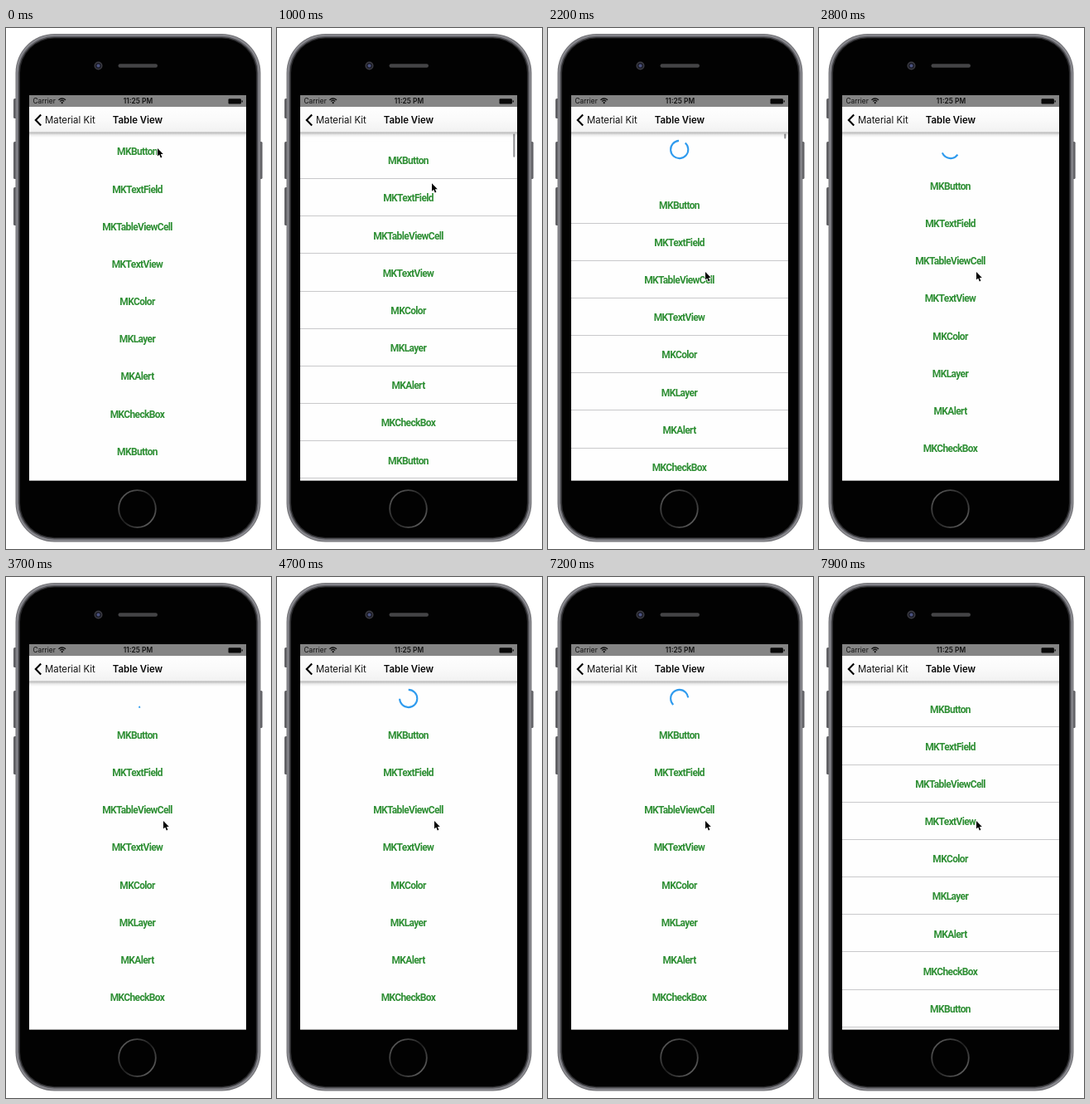
Recreate the animation shown at these times as an HTML page with a canvas. Size 320x628 px, loop 8 s.

```html
<!DOCTYPE html>
<html lang="en">
<head>
<meta charset="utf-8">
<title>Pull to refresh</title>
<style>
html, body { margin: 0; width: 100%; height: 100%; overflow: hidden; background: #fff; }
canvas { display: block; width: 320px; height: 628px; }
</style>
</head>
<body>
<canvas id="stage"></canvas>
<script>
const W = 320, H = 628, LOOP = 8000;
const canvas = document.getElementById('stage');
const ctx = canvas.getContext('2d');
const dpr = window.devicePixelRatio || 1;
canvas.width = W * dpr;
canvas.height = H * dpr;

const SCREEN = { x: 28, y: 81, w: 262, h: 464.5 };
const ROWS = ['MKButton', 'MKTextField', 'MKTableViewCell', 'MKTextView', 'MKColor',
  'MKLayer', 'MKAlert', 'MKCheckBox', 'MKButton', 'MKTextField'];
const ROW_H = 45.17, LIST_TOP = 125.6, CENTER = 158.5;
const GRAB_Y = 165.5, HELD = 41.5;
const RELEASE = 2365, CLOSE = 7680, SPIN_RATE = 1.08;
// time, x, y of the pointer
const POINTER = [[0, 183, 145], [200, 183, 145], [500, 184, 153], [770, 186, 166],
  [1000, 187, 187], [1200, 188, 216], [1400, 189, 250], [1550, 190, 275],
  [1700, 190, 292], [1900, 190, 294]];

const clamp = v => Math.max(0, Math.min(1, v));
const mix = (a, b, p) => a + (b - a) * p;
const ease = p => p * p * (3 - 2 * p);
const easeOut = p => 1 - (1 - p) ** 3;

function pointerAt(t) {
  const n = POINTER.findIndex(k => k[0] > t);
  if (n < 0) return POINTER[POINTER.length - 1].slice(1);
  const a = POINTER[n - 1], b = POINTER[n], p = (t - a[0]) / (b[0] - a[0]);
  return [mix(a[1], b[1], p), mix(a[2], b[2], p)];
}

function pullAt(t) {
  if (t < RELEASE) return Math.max(0, (pointerAt(t)[1] - GRAB_Y) / 2);
  if (t < CLOSE) return mix(64, HELD, easeOut(clamp((t - RELEASE) / 320)));
  return mix(HELD, 0, ease(clamp((t - CLOSE) / 326)));
}

function rounded(x, y, w, h, r, fill) {
  ctx.beginPath();
  ctx.roundRect(x, y, w, h, r);
  ctx.fillStyle = fill;
  ctx.fill();
}

function disc(x, y, r, fill) {
  ctx.beginPath();
  ctx.arc(x, y, r, 0, Math.PI * 2);
  ctx.fillStyle = fill;
  ctx.fill();
}

function rect(x, y, w, h, fill) {
  ctx.fillStyle = fill;
  ctx.fillRect(x, y, w, h);
}

function gradient(x0, y0, x1, y1, ...colors) {
  const g = ctx.createLinearGradient(x0, y0, x1, y1);
  colors.forEach((c, i) => g.addColorStop(i / (colors.length - 1), c));
  return g;
}

function label(text, x, y, font, color = '#000', align = 'left') {
  ctx.font = font;
  ctx.fillStyle = color;
  ctx.textAlign = align;
  ctx.fillText(text, x, y);
}

// nested outline of the phone, d pixels in from its edge
function shell(d, fill) {
  rounded(11.5 + d, 7 + d, 296 - 2 * d, 612.5 - 2 * d, 47 - d, fill);
}

function drawPhone() {
  for (const [x, y, h] of [[9, 85, 24], [9, 137, 45], [9, 192, 46], [305, 137, 45]])
    rounded(x, y, 4.6, h, 1.5, '#606064');
  shell(0, '#77777b');
  shell(1.2, '#8c8c92');
  shell(2.8, '#5c5c61');
  shell(4.2, '#262628');
  shell(5.6, '#020202');

  disc(111.5, 45.5, 5, '#3c3c43');
  disc(111.5, 45.5, 3.6, '#1c1c26');
  disc(111.5, 45.5, 2, '#4a5280');
  rounded(135.5, 43.2, 47.5, 4.6, 2.3, '#444446');

  ctx.beginPath();
  ctx.arc(158.5, 579.5, 22.3, 0, Math.PI * 2);
  ctx.strokeStyle = gradient(142, 563, 175, 596, '#555', '#1d1d1d', '#5a5a5a');
  ctx.lineWidth = 1.8;
  ctx.stroke();
}

function drawSpinner(t, pull) {
  let head = 0, tail = clamp(pull / HELD) * 0.875, turn = 0;
  if (t >= RELEASE) {
    const s = (t - RELEASE) / 1000 * SPIN_RATE, p = s % 1.5;
    turn = s * Math.PI / 2;
    head = p < 1 ? ease(p) * 0.25 : mix(0.25, 1, ease((p - 1) * 2));
    tail = p < 1 ? ease(p) : 1;
  }
  if (tail - head < 0.002) return;
  const span = Math.PI * 2, from = turn - Math.PI * 0.27;
  ctx.beginPath();
  ctx.arc(158.7, 146.5, 10.6, from + span * head, from + span * tail);
  ctx.strokeStyle = '#2f9bee';
  ctx.lineWidth = 2.1;
  ctx.stroke();
}

function drawList(t) {
  const pull = pullAt(t), top = LIST_TOP + pull;
  const moving = pull > 0.2 && (t < RELEASE + 300 || t > CLOSE);
  rect(SCREEN.x, SCREEN.y, SCREEN.w, SCREEN.h, '#fefefe');
  if (pull > 0 && t < CLOSE) drawSpinner(t, pull);
  rect(SCREEN.x, top, SCREEN.w, SCREEN.h, '#fefefe');

  ctx.fontStretch = 'condensed';
  ctx.letterSpacing = '-0.65px';
  ROWS.forEach((name, i) => {
    const y = top + i * ROW_H;
    label(name, CENTER, y + 27.8, 'bold 12px Roboto, Arial, sans-serif', '#2f8f35', 'center');
    if (moving) rect(SCREEN.x, Math.floor(y + ROW_H), SCREEN.w, 1, '#c9c9cb');
  });
  ctx.fontStretch = 'normal';
  ctx.letterSpacing = '0px';

  const bar = clamp((t - 770) / 80) * clamp((RELEASE + 300 - t) / 250);
  if (bar > 0) {
    ctx.globalAlpha = bar;
    rounded(285.3, 127.5, 2, Math.max(6, 39 - pull), 1, '#8e8e90');
    ctx.globalAlpha = 1;
  }
}

function drawBars() {
  rect(SCREEN.x, 126, SCREEN.w, 6, gradient(0, 126, 0, 132, 'rgba(0,0,0,.26)', 'rgba(0,0,0,.07)', 'rgba(0,0,0,0)'));
  rect(SCREEN.x, 95, SCREEN.w, 31, gradient(0, 95, 0, 126, '#fefefe', '#fafafa', '#f1f1f1'));
  rect(SCREEN.x, 125.4, SCREEN.w, 0.8, '#bcbcbc');
  rect(SCREEN.x, 81, SCREEN.w, 14, '#858585');

  label('Carrier', 32.5, 91.3, '8.4px Inter, sans-serif', '#111');
  label('11:25 PM', 159.5, 91.3, '600 8.4px Inter, sans-serif', '#111', 'center');
  ctx.strokeStyle = '#111';
  ctx.lineWidth = 1.3;
  for (const r of [3.4, 5.8]) {
    ctx.beginPath();
    ctx.arc(67.7, 90.8, r, -Math.PI * 0.76, -Math.PI * 0.24);
    ctx.stroke();
  }
  disc(67.7, 90.2, 1.1, '#111');
  rounded(268.5, 85.3, 15.4, 6.2, 1.2, '#080808');
  rounded(284.5, 87.2, 1.3, 2.4, 0.6, '#080808');

  ctx.beginPath();
  ctx.moveTo(42.2, 104.4);
  ctx.lineTo(35.8, 110.9);
  ctx.lineTo(42.2, 117.4);
  ctx.strokeStyle = '#000';
  ctx.lineWidth = 2.1;
  ctx.stroke();
  label('Material Kit', 47, 115, '11.4px Inter, sans-serif', '#111');
  label('Table View', 159, 115, '600 11.4px Inter, sans-serif', '#050505', 'center');
}

function drawPointer([x, y]) {
  ctx.save();
  ctx.translate(x, y);
  ctx.beginPath();
  [[0, 0], [0, 9.6], [2.2, 7.6], [3.8, 11.4], [5.4, 10.7], [3.8, 7], [6.8, 7]]
    .forEach(p => ctx.lineTo(...p));
  ctx.closePath();
  ctx.lineJoin = 'round';
  ctx.lineWidth = 1.5;
  ctx.strokeStyle = '#fff';
  ctx.stroke();
  ctx.fillStyle = '#000';
  ctx.fill();
  ctx.restore();
}

function draw(t) {
  ctx.setTransform(dpr, 0, 0, dpr, 0, 0);
  rect(0, 0, W, H, '#fff');
  drawPhone();
  ctx.save();
  ctx.beginPath();
  ctx.rect(SCREEN.x, SCREEN.y, SCREEN.w, SCREEN.h);
  ctx.clip();
  drawList(t);
  drawBars();
  ctx.restore();
  drawPointer(pointerAt(t));
}

const start = performance.now();
function tick() {
  draw((performance.now() - start) % LOOP);
  requestAnimationFrame(tick);
}
tick();
</script>
</body>
</html>
```
